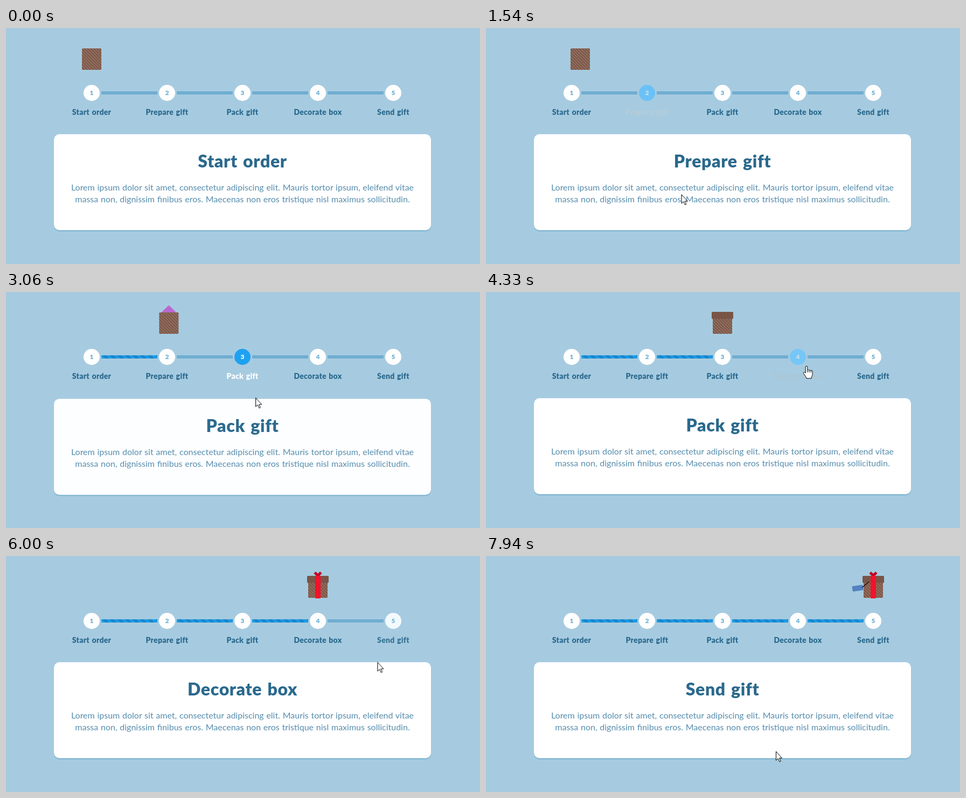
An HTML page that plays this animation: 880x440 px, repeating every 8000 ms.

```html
<!DOCTYPE html>
<html lang="en">
<head>
<meta charset="utf-8">
<title>Gift order steps</title>
<style>
  html, body { margin: 0; width: 100%; height: 100%; overflow: hidden; }
  body { background: #a6cbe0; font-family: Nunito, Lato, sans-serif; }
  #stage { position: absolute; left: 0; top: 0; width: 880px; height: 440px; overflow: hidden; }
  #stage > * { position: absolute; }
  svg { overflow: visible; }

  .step { top: 106px; width: 140px; text-align: center; white-space: nowrap; font-weight: 900; }
  .dot {
    width: 30px; height: 30px; margin: 0 auto; border-radius: 50%;
    background: #fff; color: #6badd1; font-size: 12px; line-height: 30px;
  }
  .label, h1 { letter-spacing: .02em; word-spacing: .07em; color: #2a698d; }
  .label {
    position: absolute; left: 0; top: 40.6px; width: 140px;
    font-size: 14px; line-height: 20px;
  }
  .line { top: 118px; width: 104px; height: 6px; background: #70aed2; }
  .fill {
    height: 100%;
    background: repeating-linear-gradient(45deg, #1e9be8 0 5px, #1985c9 5px 10px);
  }
  .card {
    left: 89px; top: 198px; width: 700px; height: 179px; border-radius: 10px;
    background: #fff; box-shadow: 0 2px 1px #7cb2d0; text-align: center; white-space: nowrap;
  }
  .card > * { position: absolute; left: 0; width: 100%; margin: 0; }
  h1 { top: 28px; font-size: 32px; line-height: 44px; font-weight: 900; }
  p { top: 88px; color: #568dad; font-size: 16px; line-height: 22px; word-spacing: .04em; }

  #box { left: 141px; top: 38px; }
  #bow, #ribbon { transform-origin: 18px -1px; }
  #tag { transform-origin: 10px 10px; }
  #cursor { left: 0; top: 0; }
</style>
</head>
<body>
<div id="stage">
  <svg id="box" width="36" height="40">
    <defs>
      <pattern id="weave" width="4" height="4" patternUnits="userSpaceOnUse" patternTransform="rotate(-45)">
        <path fill="#795548" d="M0 0h4v4H0z"/>
        <path fill="#93705f" d="M0 0h2v4H0z"/>
      </pattern>
    </defs>
    <g id="gift"><rect x="8" y="-9.5" width="20" height="20" rx="2" fill="#ba68d0" transform="rotate(45 18 .5)"/></g>
    <rect width="36" height="40" rx="1.5" fill="url(#weave)"/>
    <rect id="lid" x="-2" y="-1" width="40" height="13" rx="1.5" fill="#795548"/>
    <path id="bow" d="M18-1.5l-5.8-5.8M18-1.5l5.8-5.8" stroke="#c0021f" stroke-width="5"/>
    <rect id="ribbon" x="13" y="-1" width="10" height="42" rx="1" fill="#f5102a"/>
    <g id="tag">
      <rect x="-21" y="17" width="20" height="10" rx="1.5" fill="#5482c2" transform="rotate(-8 -11 22)"/>
      <path d="M-3 21L10 10" stroke="#111" stroke-width="1.5"/>
    </g>
  </svg>
  <svg id="cursor" width="20" height="24" fill="#fff" stroke="#000" stroke-linejoin="round">
    <path id="arrow" d="M.5.5V17l3.7-3.4 2.6 6 2.4-1-2.6-5.8h5z"/>
    <path id="hand" d="M-1.8 2a1.8 1.8 0 0 1 3.6 0V8a1.7 1.7 0 0 1 3.2.5a1.7 1.7 0 0 1 3.2.7a1.5 1.5 0 0 1 2.9 1V15.5c0 3-2 4-2 7.5H0c-1-4-4-6-5.6-9.5c-.7-2 1.6-3 3.8-.5zM1.8 8v4M5 8.5v3.5M8.2 9.2v3"/>
  </svg>
</div>
<script>
const LOOP = 8000, MOVE = 600, MOVE_DELAY = 75, FADE = 300, TRAVEL = 250, GAP = 140;
const LOREM = 'Lorem ipsum dolor sit amet, consectetur adipiscing elit. Mauris tortor ipsum, eleifend vitae<br>' +
  'massa non, dignissim finibus eros. Maecenas non eros tristique nisl maximus sollicitudin.';
const NAMES = ['Start order', 'Prepare gift', 'Pack gift', 'Decorate box', 'Send gift'];

// One visit per clicked step: pointer enters, card swaps, pointer leaves for its rest.
const START = [237, 325];
const VISITS = [
  { enter: 850, swap: 1325, leave: 1310, spot: [308, 128], rest: [367, 325] },
  { enter: 2360, swap: 2920, leave: 3000, spot: [448, 130], rest: [510, 404] },
  { enter: 4225, swap: 4805, leave: 4845, spot: [595, 138], rest: [590, 398] },
  { enter: 5980, swap: 6505, leave: 6645, spot: [722, 132], rest: [677, 409] },
];

const $ = id => document.getElementById(id);
const shift = (x, y) => ({ transform: `translate(${x}px, ${y}px)` });

// Each key is [time in ms, properties, easing to the next key].
function track(el, keys) {
  const frames = [[0, keys[0][1]], ...keys, [LOOP, keys.at(-1)[1]]]
    .map(([t, props, easing = 'linear']) => ({ ...props, offset: t / LOOP, easing }));
  el.animate(frames, { duration: LOOP, iterations: Infinity });
}

const change = (el, start, length, from, to, easing = 'ease') =>
  track(el, [[start, from, easing], [start + length, to]]);

function add(className, left, html) {
  const el = document.createElement('div');
  el.className = className;
  if (left) el.style.left = left + 'px';
  el.innerHTML = html;
  $('stage').insertBefore(el, $('box'));
  return el;
}

function addStep(i, x) {
  const step = add('step', x - GAP / 2, `<div class="dot">${i + 1}</div><div class="label">${NAMES[i]}</div>`);
  if (!i) return;
  const { enter, leave } = VISITS[i - 1], out = leave + TRAVEL - 85;
  const hover = (el, off, on) => track(el, [
    [enter, off, 'ease'], [enter + FADE, on], [out, on, 'ease'], [out + FADE, off]]);
  hover(step.firstChild, { backgroundColor: '#fff', color: '#6badd1' },
    { backgroundColor: '#1ea1f1', color: '#fff' });
  hover(step.lastChild, { color: '#2a698d' }, { color: '#fff' });
}

// The fill's edge follows the centre of the moving box.
function addLine(i, x) {
  const line = add('line', x + 18, '<div class="fill"></div>');
  change(line.firstChild, VISITS[i].swap + MOVE_DELAY, MOVE,
    { clipPath: 'inset(0 122px 0 0)' }, { clipPath: 'inset(0 -18px 0 0)' }, 'ease-in-out');
}

function addCard(i) {
  const hidden = { opacity: 0, ...shift(0, 50) }, shown = { opacity: 1, ...shift(0, 0) };
  const from = VISITS[i - 1]?.swap, until = VISITS[i]?.swap;
  const keys = i ? [[from, hidden, 'ease'], [from + 175, shown]] : [];
  if (until) keys.push([until, shown], [until, hidden]);
  track(add('card', 0, `<h1>${NAMES[i]}</h1><p>${LOREM}</p>`), keys);
}

NAMES.forEach((name, i) => {
  const x = 159 + GAP * i;
  if (VISITS[i]) addLine(i, x);
  addStep(i, x);
  addCard(i);
});

track($('box'), VISITS.flatMap(({ swap }, i) => [
  [swap + MOVE_DELAY, shift(GAP * i, 0), 'ease-in-out'],
  [swap + MOVE_DELAY + MOVE, shift(GAP * (i + 1), 0)]]));

// Parts appear as the box arrives at each step.
const [atPrepare, atPack, atDecorate, atSend] = VISITS.map(v => v.swap + MOVE_DELAY + MOVE);
const drop = (y, opacity = 1) => ({ opacity, ...shift(0, y) });
track($('gift'), [
  [atPrepare, drop(-13, 0), 'ease-in'], [atPrepare + 300, drop(0)],
  [atPack - 150, drop(0), 'ease-in'], [atPack + 50, drop(16)]]);
change($('lid'), atPack, 250, drop(-17, 0), drop(0), 'ease-in');
change($('ribbon'), atDecorate, 250, { transform: 'scaleY(0)' }, { transform: 'scaleY(1)' });
change($('bow'), atDecorate + 125, 250, { transform: 'scale(0)' }, { transform: 'scale(1)' });
change($('tag'), atSend, 300,
  { opacity: 0, transform: 'rotate(-50deg)' }, { opacity: 1, transform: 'rotate(0deg)' });

const pointer = (t, point, opacity = 1) => [t, { opacity, ...shift(...point) }];
track($('cursor'), [
  pointer(550, START, 0),
  pointer(550, START),
  ...VISITS.flatMap(({ enter, leave, spot, rest }, i) => [
    pointer(enter - 220, i ? VISITS[i - 1].rest : START),
    pointer(enter + 100, spot),
    pointer(leave, spot),
    pointer(leave + TRAVEL, rest)]),
  pointer(7770, VISITS[3].rest),
  pointer(7940, [538, 364])]);

const showHand = (el, on, off) => track(el, [[0, { opacity: off }, 'step-end'],
  ...VISITS.flatMap(({ enter, leave }) => [
    [enter + 50, { opacity: on }, 'step-end'], [leave + 50, { opacity: off }, 'step-end']])]);
showHand($('hand'), 1, 0);
showHand($('arrow'), 0, 1);
</script>
</body>
</html>
```
